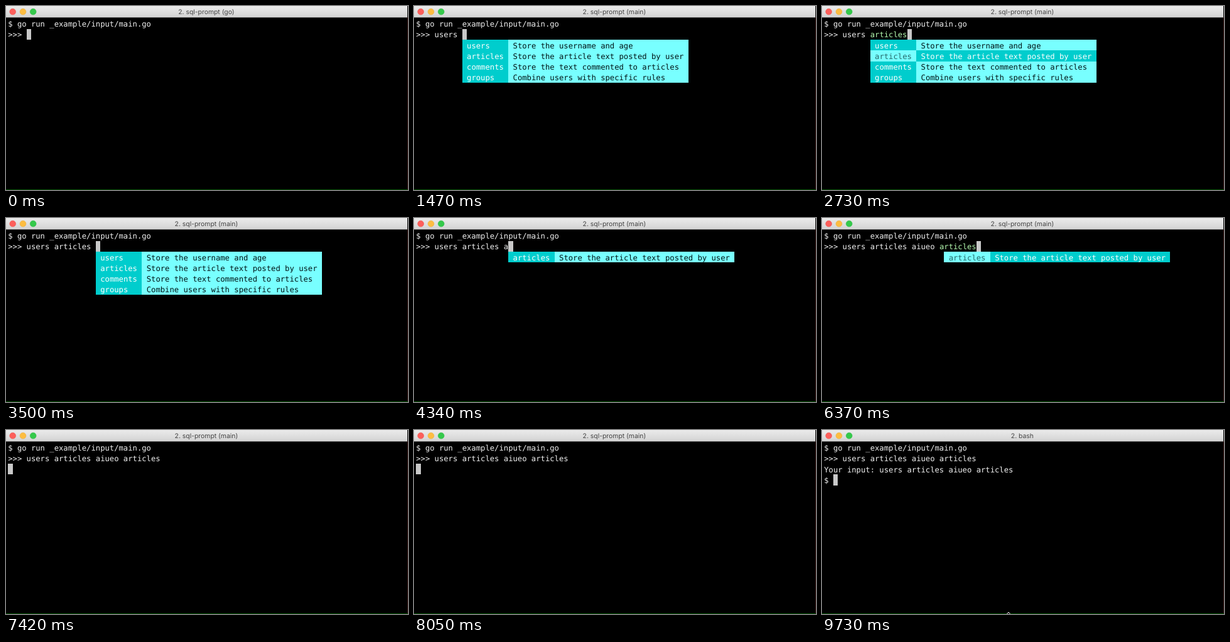
An HTML page that plays this animation: 640x295 px, repeating every 9.8 s.

```html
<!DOCTYPE html>
<html lang="en">
<head>
<meta charset="utf-8">
<title>Terminal prompt</title>
<style>
  html, body { margin: 0; width: 100%; height: 100%; overflow: hidden; background: #000; }
  svg { display: block; width: 640px; height: 295px; }
  text { white-space: pre; text-rendering: geometricPrecision; }
  .mono { font: 12.21px "DejaVu Sans Mono", monospace; }
  .mono rect { shape-rendering: crispEdges; }
  .title { font: 10.4px Inter, sans-serif; fill: #444; text-anchor: middle; }
</style>
</head>
<body>
<svg viewBox="0 0 640 295">
  <defs>
    <linearGradient id="bar" x2="0" y2="1">
      <stop stop-color="#ebebeb"/>
      <stop offset="1" stop-color="#d3d3d3"/>
    </linearGradient>
  </defs>
  <rect width="640" height="295"/>
  <rect x="639" y="18" width="1" height="276" fill="#3c1c1a"/>
  <rect y="294" width="640" height="1" fill="#065206"/>
  <rect width="639" height="18" fill="url(#bar)"/>
  <rect y="18" width="639" height="0.5" fill="#a9a9a9"/>
  <g stroke-width="0.5">
    <circle cx="10.7" cy="9.2" r="4.9" fill="#fc5f5b" stroke="#e8504b"/>
    <circle cx="27" cy="9.2" r="4.9" fill="#fdbd41" stroke="#e6a938"/>
    <circle cx="43.2" cy="9.2" r="4.9" fill="#35c94b" stroke="#2cb640"/>
  </g>
  <text id="title" class="title" x="318.9" y="13.1"></text>
  <g id="screen" class="mono"></g>
  <path id="pointer" d="M294.5 295 297 292 299.5 295" fill="#000" stroke="#fff" stroke-width="1"/>
</svg>
<script>
const LOOP = 9800, COL = 7.35, ROW = 17.05, LEFT = 3.2, TOP = 20.3;
const WHITE = '#f0f0f0', GREEN = '#b5fbb0', TEAL = '#00cdcd', AQUA = '#78ffff';

const tables = [
  ['users', 'Store the username and age'],
  ['articles', 'Store the article text posted by user'],
  ['comments', 'Store the text commented to articles'],
  ['groups', 'Combine users with specific rules']
];

// [time, typed text, index of the selected suggestion]
const keys = [
  [0, ''],
  [490, 'u'],
  [980, 'u', 0],
  [1470, 'users '],
  [1960, 'users ', 0],
  [2450, 'users ', 1],
  [3500, 'users articles '],
  [4200, 'users articles a'],
  [4410, 'users articles ai'],
  [4620, 'users articles aiu'],
  [4690, 'users articles aiue'],
  [4830, 'users articles aiueo'],
  [4970, 'users articles aiueo '],
  [5530, 'users articles aiueo a'],
  [6020, 'users articles aiueo a', 0]
];
const titles = [[0, 'sql-prompt (go)'], [70, 'sql-prompt (main)'], [8540, 'bash']];
const ENTER = 7350, OUTPUT = 8120, POINTER = 9730;
const FINAL = 'users articles aiueo articles';

const el = id => document.getElementById(id);
const at = (list, t) => list.filter(k => k[0] <= t).pop();
const px = col => LEFT + col * COL;
const py = row => TOP + row * ROW;

const text = (row, col, str, fill = WHITE) =>
  `<text x="${px(col)}" y="${py(row) + 13.1}" fill="${fill}">${str.replace(/>/g, '&gt;')}</text>`;

const box = (row, col, cols, fill) =>
  `<rect x="${px(col)}" y="${py(row)}" width="${cols * COL}" height="${ROW}" fill="${fill}"/>`;

const cursor = (row, col) => box(row, col, 1, '#c9c9c9');

function popup(col, items, selected) {
  const nameCols = Math.max(...items.map(i => i[0].length)) + 2;
  const noteCols = Math.max(...items.map(i => i[1].length)) + 2;
  return items.map(([name, note], i) => {
    const on = i === selected, row = i + 2;
    return box(row, col, nameCols, on ? AQUA : TEAL) +
      box(row, col + nameCols, noteCols, on ? TEAL : AQUA) +
      text(row, col + 1, name, on ? '#26686a' : '#fff') +
      text(row, col + nameCols + 1, note, on ? '#fff' : '#001416');
  }).join('');
}

function prompt(t) {
  const [, typed, selected] = at(keys, t);
  const start = typed.lastIndexOf(' ') + 1;
  const word = typed.slice(start);
  const items = typed ? tables.filter(i => i[0].startsWith(word)) : [];
  const picked = selected !== undefined;
  const kept = picked ? typed.slice(0, start) : typed;
  const preview = picked ? items[selected][0] : '';
  return text(1, 0, '>>> ' + kept) +
    text(1, 4 + kept.length, preview, GREEN) +
    (items.length ? popup(4 + typed.length, items, selected) : '') +
    cursor(1, 4 + kept.length + preview.length);
}

function result(t) {
  const line = text(1, 0, '>>> ' + FINAL);
  return t < OUTPUT
    ? line + cursor(2, 0)
    : line + text(2, 0, 'Your input: ' + FINAL) + text(3, 0, '$') + cursor(3, 2);
}

let shown = '';
function draw(t) {
  const html = text(0, 0, '$ go run _example/input/main.go') + (t < ENTER ? prompt(t) : result(t));
  if (html !== shown) el('screen').innerHTML = shown = html;
  el('title').textContent = '2. ' + at(titles, t)[1];
  el('pointer').style.display = t < POINTER ? 'none' : '';
}

const begin = performance.now();
function tick() {
  draw((performance.now() - begin) % LOOP);
  requestAnimationFrame(tick);
}
tick();
</script>
</body>
</html>
```
